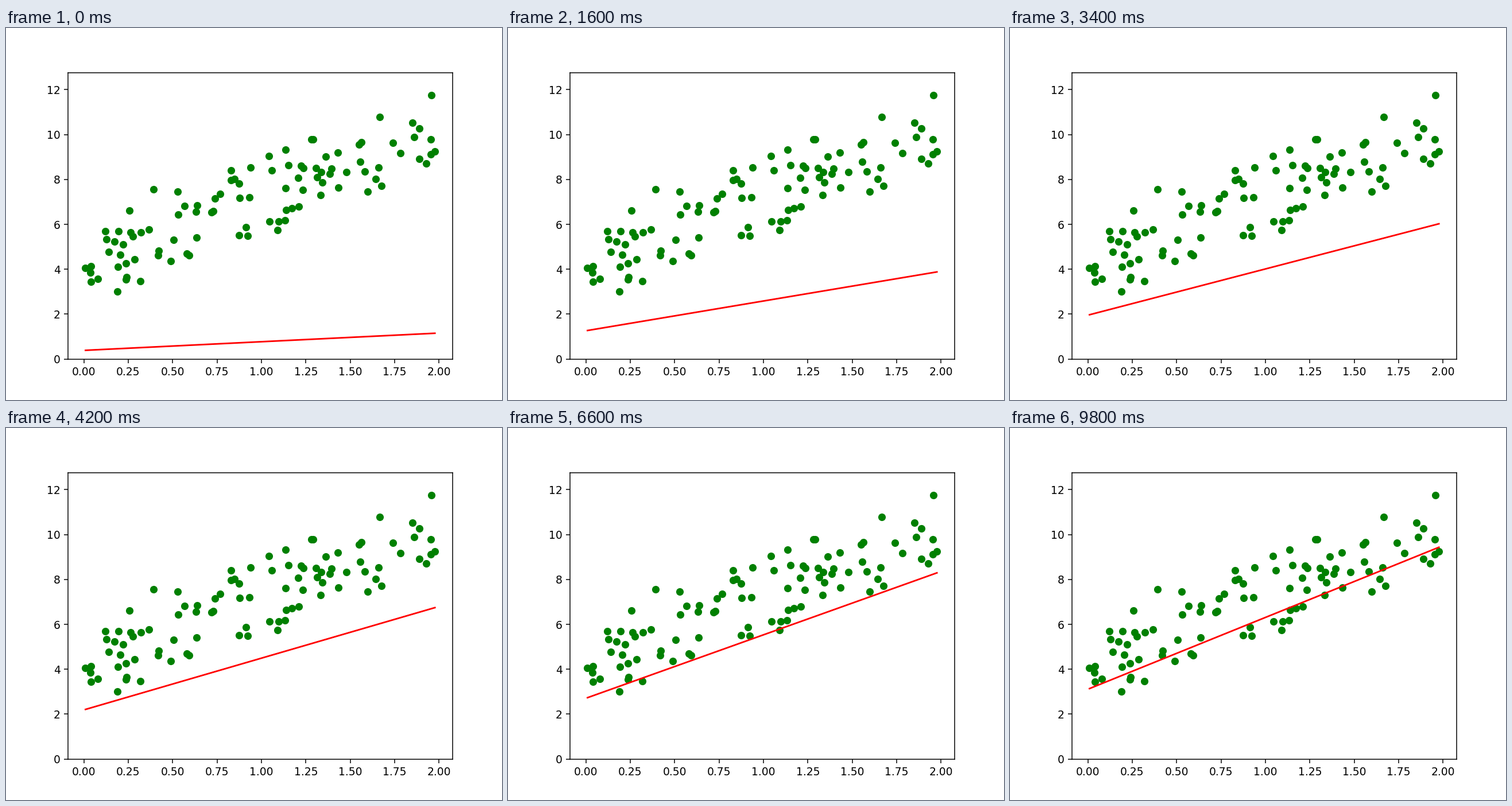
Recreate the animation shown at these times as a matplotlib script. Size 864 by 648 pixels, loop 10000 ms.

```python
import numpy as np
import matplotlib.pyplot as plt
from matplotlib.animation import FuncAnimation

FRAMES = 50
INTERVAL = 200
RATE = 0.01
START = (0.387, 0.386)  # intercept, slope

# Noisy samples around y = 4 + 3x
np.random.seed(0)
x = 2 * np.random.rand(100)
y = 4 + 3 * x + np.random.randn(100)
design = np.column_stack([np.ones_like(x), x])


def descend(steps):
    """Gradient descent on the mean squared error, one theta per step."""
    theta = np.array(START)
    path = [theta]
    for _ in range(steps - 1):
        grad = 2 / len(x) * design.T @ (design @ theta - y)
        theta = theta - RATE * grad
        path.append(theta)
    return path


thetas = descend(FRAMES)
ends = np.array([x.min(), x.max()])

fig, ax = plt.subplots(figsize=(6.4, 4.8), dpi=135)
ax.scatter(x, y, color="green")
line, = ax.plot(ends, thetas[0][0] + thetas[0][1] * ends, color="red")
ax.set_ylim(0, y.max() + 1)


def update(i):
    intercept, slope = thetas[i]
    line.set_ydata(intercept + slope * ends)
    return line,


anim = FuncAnimation(fig, update, frames=FRAMES, interval=INTERVAL,
                     repeat=True, repeat_delay=0)
plt.show()
```
